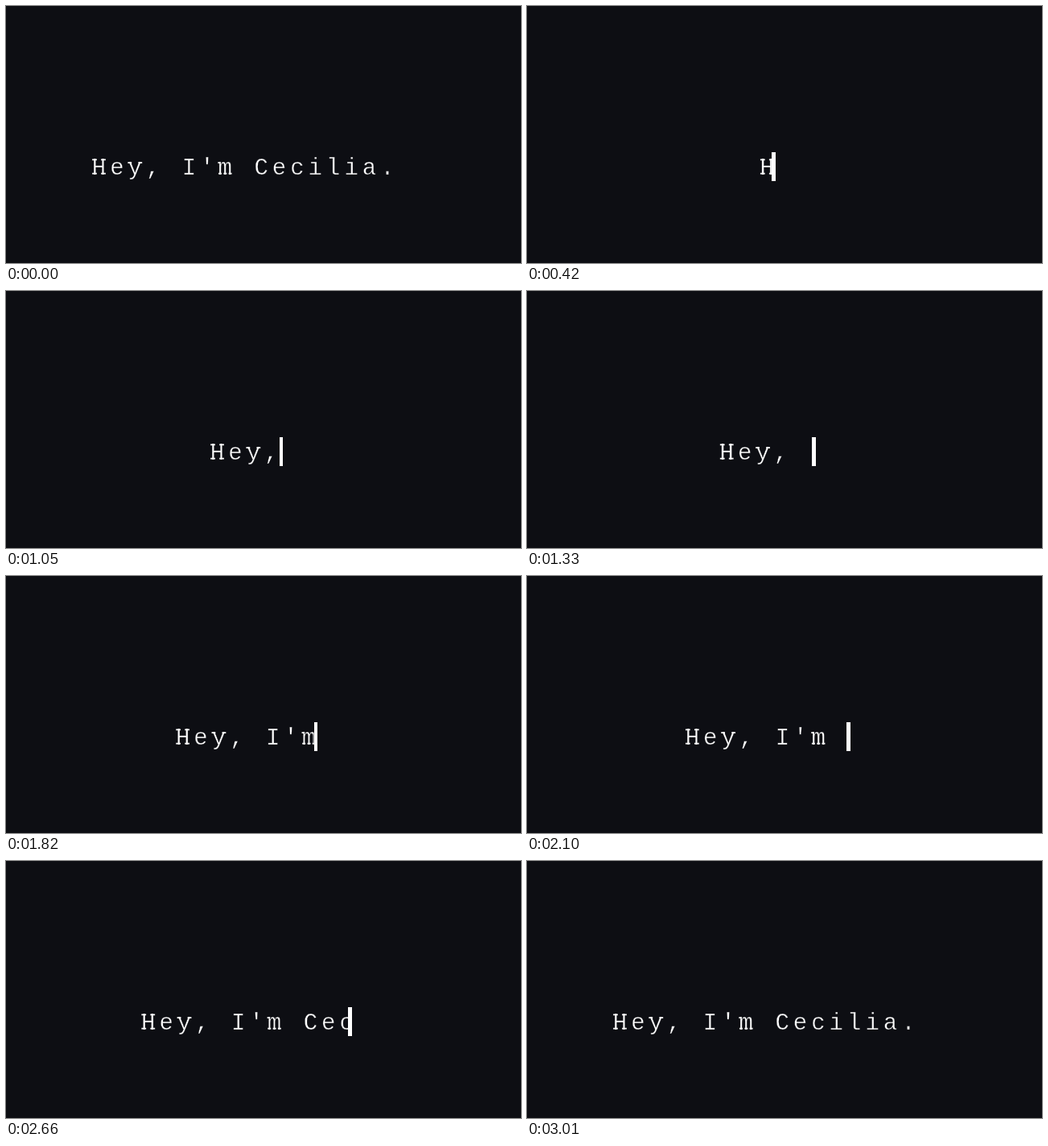
An HTML page that plays this animation: 640x320 px, repeating every 3.29 s.

```html
<!DOCTYPE html>
<html lang="en">
<head>
<meta charset="utf-8">
<title>Typed greeting</title>
<style>
  html, body { margin: 0; width: 100%; height: 100%; overflow: hidden; background: #0d0e13; }
  #stage { display: block; width: 100vw; height: 100vh; }
  text {
    font: 29px "Liberation Mono", monospace;
    letter-spacing: 5px;
    white-space: pre;
    fill: #fff;
    stroke: #0d0e13;
    stroke-width: .4;
  }
  #serifs { fill: none; stroke: #fff; stroke-width: 1.8; }
</style>
</head>
<body>
<svg id="stage" viewBox="0 0 640 320">
  <svg id="line" y="180" height="42" overflow="hidden">
    <text x="0.9" y="29.5">Hey, I'm Cecilia.</text>
    <path id="serifs"/>
  </svg>
  <rect id="caret" y="182" width="4.8" height="36" fill="#fff" shape-rendering="crispEdges"/>
</svg>
<script>
const LOOP = 3290;
const CENTER = 298.7;
const PITCH = 22.4;
const CARET = 4.8;
const FULL = 17 * PITCH;
const BASE = 29.5;

const line = document.getElementById("line");
const caret = document.getElementById("caret");

// Slab ends for the letters that the font leaves plain
const slab = (cell, x, y, half) =>
  `M${cell * PITCH + 0.9 + x - half} ${y}h${half * 2}`;
const foot = BASE - 0.9, capTop = BASE - 18.2, midTop = BASE - 14.4;
document.getElementById("serifs").setAttribute("d", [
  ...[3.2, 14.2].flatMap(x => [slab(0, x, foot, 2.9), slab(0, x, capTop, 2.9)]),
  ...[2.2, 15.2].map(x => slab(2, x, midTop, 2.4)),
  ...[2.4, 8.8, 15].map(x => slab(7, x, foot, 2)),
  slab(7, 1.4, midTop, 1.6)
].join(""));

// Eight steps per 1050 ms: seven of 140 ms and a short one of 70 ms
function stepAt(t) {
  const block = Math.floor((t - 770) / 1050);
  const rest = t - 770 - block * 1050;
  return 2 + 8 * block + Math.floor(rest / 140);
}

function draw(t) {
  const k = stepAt(t);
  const typing = k >= -1 && k <= 17;
  const width = typing ? 29.5 + 14.3 * k : FULL;
  const left = CENTER - (width + CARET) / 2;
  const lit = k === -3 || (k + 8) % 6 < 3;

  line.setAttribute("x", left);
  line.setAttribute("width", width);
  caret.setAttribute("x", left + width);
  caret.setAttribute("visibility", lit ? "visible" : "hidden");
}

const start = performance.now();
function tick() {
  draw((performance.now() - start) % LOOP);
  requestAnimationFrame(tick);
}
tick();
</script>
</body>
</html>
```
